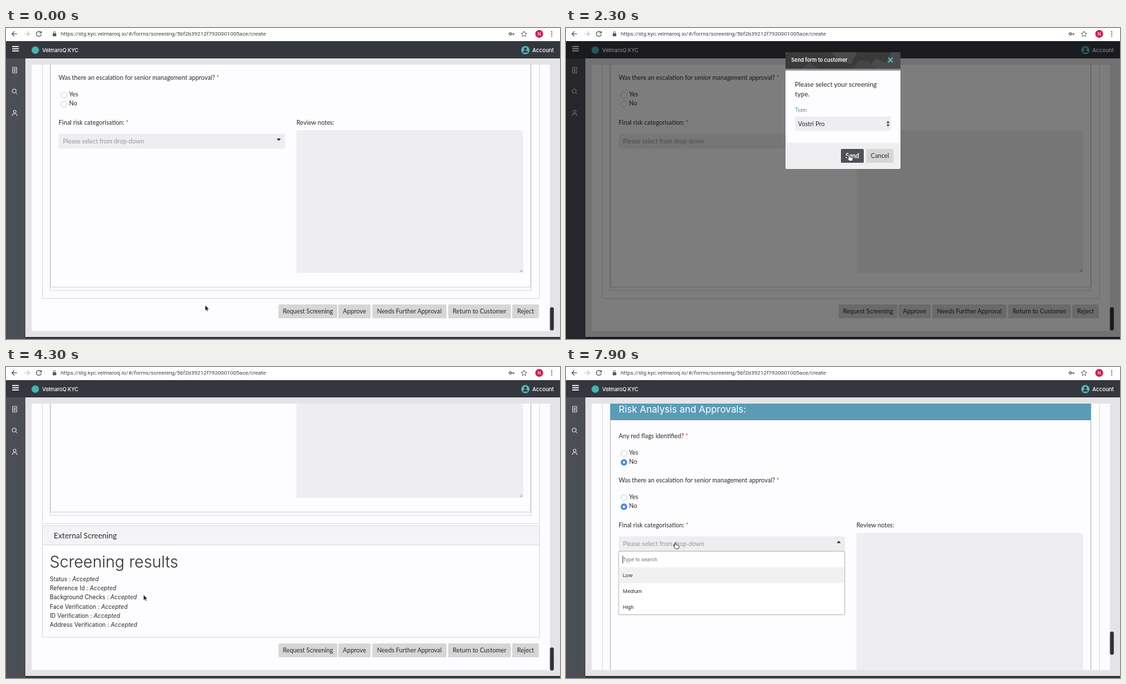
Animation of 800 by 450 pixels, one loop 8 s. Source, as an HTML page:

```html
<!DOCTYPE html>
<html lang="en">
<head>
<meta charset="utf-8">
<title>Screening form</title>
<style>
html, body { margin: 0; width: 100%; height: 100%; overflow: hidden; background: #fff; }
svg { display: block; width: 100vw; height: 100vh; }
text { font: 8.95px Lato, sans-serif; fill: #2b2b2b; white-space: pre; }
.ui { font-family: Inter, sans-serif; }
.menu { font: 7.65px Roboto, sans-serif; }
.mid { text-anchor: middle; }
.hot { fill: #fff; stroke: #fff; stroke-width: .3; }
.line { fill: none; stroke: #dcdcde; }
.icon { fill: none; stroke: #55585c; stroke-width: 1.1; }
.side { fill: none; stroke: #e4e5e7; stroke-width: 1; }
</style>
</head>
<body>
<svg id="stage" viewBox="0 0 800 450"></svg>
<script>
const LOOP = 8000, STEP = 100;

const rect = (x, y, w, h, fill, extra = '') =>
  `<rect x="${x}" y="${y}" width="${w}" height="${h}" fill="${fill}" ${extra}/>`;
const text = (x, y, str, cls = '', style = '') =>
  `<text x="${x}" y="${y}" class="${cls}" style="${style}">${str}</text>`;
const path = (d, cls = '', extra = '') => `<path d="${d}" class="${cls}" ${extra}/>`;
const circle = (x, y, r, fill, extra = '') =>
  `<circle cx="${x}" cy="${y}" r="${r}" fill="${fill}" ${extra}/>`;
const group = (id, body, extra = '') => `<g id="${id}" ${extra}>${body}</g>`;

const label = (x, y, str, required) =>
  text(x, y, str + (required ? '<tspan fill="#d0342c"> *</tspan>' : ''));

const button = (id, x, y, w, str) => group(id,
  rect(x, y, w, 20, '#d6d6d6', 'rx="1.5"') + text(x + w / 2, y + 13.1, str, 'mid'));

const radio = (y, str, id) =>
  circle(83.7, y + 1, 4.3, '#fff', 'stroke="#c4c4c6" stroke-width=".8"') +
  (id ? group(id, circle(83.7, y + 1, 4.6, '#3f8ee0') + circle(83.7, y + 1, 1.7, '#fff')) : '') +
  text(91, y + 3.1, str);

const browserBar = () =>
  rect(0, 0, 800, 19, '#fff') +
  path('M16 8.5H9M12 5L8.5 8.5L12 12', 'icon') +
  path('M26.5 8.5H33.5M30.5 5L34 8.5L30.5 12', 'icon', 'style="stroke:#c6c8ca"') +
  path('M50.3 6.3A3.6 3.6 0 1 0 51 9.2M51.2 4.5V7.2H48.4', 'icon') +
  rect(67.5, 7.6, 5, 4.4, '#55585c', 'rx=".6"') +
  path('M68.6 7.6V6.4a1.4 1.4 0 0 1 2.8 0V7.6', 'icon', 'style="stroke-width:.8"') +
  text(79, 11.3, 'https://stg.kyc.velmaroq.io/#/forms/screening/5bf2b39212f7920001005ace/create',
    '', 'font:7.94px Roboto,sans-serif;fill:#3f4245') +
  circle(728.3, 8.5, 1.7, 'none', 'stroke="#55585c" stroke-width="1.2"') +
  path('M730 8.5H734M732.8 8.5V10.4', 'icon') +
  path('M748 4.6l1.2 2.7 2.9.3-2.2 1.9.7 2.8-2.6-1.5-2.6 1.5.7-2.8-2.2-1.9 2.9-.3z', 'icon', 'style="stroke-width:.8"') +
  circle(770, 8.5, 5.7, '#cf2057') +
  text(770, 10.9, 'N', 'mid', 'font:6.5px Roboto,sans-serif;fill:#fff') +
  [5.4, 8.5, 11.6].map(y => circle(788, y, .9, '#55585c')).join('');

const appFrame = () =>
  rect(0, 19, 800, 431, '#34373e') +
  rect(0, 44, 28, 406, '#4b4e55') +
  rect(28, 44, 772, 403, '#e4e3e6') +
  rect(37, 53, 748.5, 385.5, '#fdfcfe') +
  path('M9 26.8H18.5M9 30H18.5M9 33.2H18.5', 'side', 'style="stroke:#fff;stroke-width:1.6"') +
  path('M9.5 57H15.5V65H9.5ZM11 59.3H14M11 61H14M11 62.7H14', 'side', 'style="stroke-width:.9"') +
  circle(11.8, 91.2, 2.9, 'none', 'stroke="#e4e5e7"') + path('M14 93.4L16.3 95.7', 'side') +
  circle(12.5, 121, 2, 'none', 'stroke="#e4e5e7"') +
  path('M8.8 127.2a3.7 3.4 0 0 1 7.4 0', 'side') +
  circle(42.3, 32, 5.4, '#45b3b0') +
  text(52.3, 34.8, 'VelmaroQ KYC', 'ui', 'font-size:7.6px;font-weight:500;letter-spacing:-.1px;fill:#fff') +
  circle(750, 32, 6, '#58b9bb') + circle(750, 30.2, 2, '#34373e') +
  path('M746.4 35.6a3.6 3.2 0 0 1 7.2 0z', '', 'fill="#34373e"') +
  text(760, 34.8, 'Account', 'ui', 'font-size:7.8px;font-weight:500;fill:#fff');

const form = () =>
  path('M52.5 -200V391.5H770.5V-200', 'line') +
  path('M63.5 -200V379.8H758.5V-200', 'line') +
  path('M64.5 -200V375H757.5V-200', 'line', 'style="stroke:#d2d2d5"') +
  rect(64, -51, 694, 36, '#5a9cb6') +
  text(76, -25.6, 'Risk Analysis and Approvals:', 'ui', 'font-size:13.6px;fill:#fff') +
  label(76, 11.2, 'Any red flags identified?', true) +
  radio(32, 'Yes') + radio(45, 'No', 'flagNo') +
  label(76, 75.4, 'Was there an escalation for senior management approval?', true) +
  radio(96, 'Yes') + radio(109.2, 'No', 'escalNo') +
  label(76, 139.8, 'Final risk categorisation:', true) +
  rect(76, 153, 327, 21.5, '#eeedef', 'rx="1.5"') +
  text(82.3, 166.6, 'Please select from drop-down', '', 'fill:#97979a') +
  path('', '', 'id="caret" fill="#222"') +
  label(419.5, 139.8, 'Review notes:') +
  rect(419.5, 148, 327, 206.3, '#eeedef', 'rx="1.5"') +
  path('M742 353.2L745.7 349.5M744.2 353.2L745.7 351.7', '', 'stroke="#777" stroke-width=".7"');

const results = () => {
  const rows = ['Status', 'Reference Id', 'Background Checks', 'Face Verification',
    'ID Verification', 'Address Verification'];
  return rect(52.5, 394.5, 718, 161.5, '#fdfcfe', 'stroke="#dcdcde"') +
    rect(52.5, 394.5, 718, 28, '#f4f4f6', 'stroke="#dcdcde"') +
    text(69, 412.8, 'External Screening', '', 'font-size:11.15px') +
    text(63, 455, 'Screening results', 'ui', 'font-size:23px;font-weight:300') +
    rows.map((row, i) => text(63.3, 474.6 + i * 13.36,
      `${row} : <tspan font-style="italic">Accepted</tspan>`, 'ui', 'font-size:8.45px')).join('');
};

const actions = () =>
  rect(391.8, 398.4, 88.4, 23.2, '#a9adb1', 'id="glow" rx="3"') +
  button('request', 393.5, 400, 85, 'Request Screening') +
  button('approve', 480, 400, 46.5, 'Approve') +
  button('further', 529, 400, 107, 'Needs Further Approval') +
  button('back', 638.5, 400, 90.5, 'Return to Customer') +
  button('reject', 731, 400, 38.5, 'Reject');

const dropdown = () =>
  rect(76, 174.5, 326.6, 92, '#fff', 'stroke="#b3b3b6" stroke-width=".9" rx="1"') +
  rect(76.5, 197.8, 325.6, 23, '#f0f1f2') +
  rect(81.6, 181, .8, 11, '#222') +
  text(82, 189, 'Type to search', 'menu', 'fill:#75757a') +
  ['Low', 'Medium', 'High'].map((s, i) => text(82, 212.2 + i * 22.8, s, 'menu')).join('');

const modal = () =>
  rect(0, 19, 800, 431, '#000', 'opacity=".5"') +
  rect(317, 35, 166, 169, '#fdfcfe', 'rx="3"') +
  path('M317 59V38a3 3 0 0 1 3-3H480a3 3 0 0 1 3 3V59z', '', 'fill="#3a3a3b"') +
  path('M382 35L396 48L412 52L420 35ZM436 59L447 44L462 50L470 35H479L483 41V59Z', '', 'fill="#4a4a4b"') +
  path('M414 59L424 46L438 49L446 59ZM340 59L352 50L366 59Z', '', 'fill="#454546"') +
  rect(317, 59, 166, 2.6, '#8d8d8f') +
  text(325.3, 49, 'Send form to customer', 'ui', 'font-size:7.35px;font-weight:600;fill:#fff') +
  path('M465.4 43L471.8 49.6M471.8 43L465.4 49.6', '', 'stroke="#5cc0c4" stroke-width="1.7"') +
  text(330.6, 85.2, 'Please select your screening', '', 'font-size:9.65px') +
  text(330.6, 98.6, 'type.', '', 'font-size:9.65px') +
  text(330.8, 120.8, 'Type:', '', 'font-size:7.5px;fill:#4c8ca3') +
  rect(331, 128, 138.5, 21, '#eeedef', 'rx="1.5"') +
  text(335, 141.6, 'Vostri Pro') +
  path('M462.8 137.5L465 134.3L467.2 137.5ZM462.8 139.5L465 142.7L467.2 139.5Z', '', 'fill="#333"') +
  path('M317 166H483V201a3 3 0 0 1-3 3H320a3 3 0 0 1-3-3z', '', 'fill="#efeff1"') +
  button('send', 397, 175, 33, 'Send') +
  button('cancel', 433.5, 175, 39.5, 'Cancel');

const pointer = () =>
  path('M0 0V8.2L1.9 6.5L3.2 9.3L4.6 8.7L3.3 6H5.9Z', '', 'id="arrow" fill="#111" stroke="#fff" stroke-width=".6"') +
  path('M.2 .7Q1.1-.3 2 .7V3.2Q3.2 2.7 3.8 3.5Q5 3.1 5.4 4Q6.6 3.9 6.7 5V6.9L5.9 9H1.6L-.9 5.9Q-1-.1 .2 5.3Z',
    '', 'id="hand" fill="#fff" stroke="#222" stroke-width=".8"');

document.getElementById('stage').innerHTML =
  '<clipPath id="clip"><rect x="37" y="53" width="748.5" height="385.5"/></clipPath>' +
  appFrame() +
  `<g clip-path="url(#clip)">${group('page',
    form() + group('panel', results()) + group('actions', actions()) + group('dropdown', dropdown()))}</g>` +
  rect(785.5, 404, 5.6, 33.5, '#323338', 'id="thumb" rx="2.6"') +
  group('modal', modal()) + browserBar() + group('pointer', pointer());

const $ = id => document.getElementById(id);
const show = (id, on) => { $(id).style.display = on ? '' : 'none'; };
const move = (id, x, y) => $(id).setAttribute('transform', `translate(${x} ${y})`);
const smooth = p => p * p * (3 - 2 * p);

// Eased value of [time, ...values] keys at time t.
function track(keys, t) {
  const i = keys.findIndex(k => k[0] > t);
  if (i < 0) return keys[keys.length - 1].slice(1);
  if (i === 0) return keys[0].slice(1);
  const a = keys[i - 1], b = keys[i];
  const p = smooth((t - a[0]) / (b[0] - a[0]));
  return a.slice(1).map((v, j) => v + (b[j + 1] - v) * p);
}

const POINTER = [
  [0, 287.5, 401], [900, 426, 407], [1400, 426, 407], [2300, 407.5, 183.5],
  [3300, 407.5, 183], [4200, 198.5, 316], [4300, 198.5, 329.5], [5100, 173, 367],
  [5800, 173, 367], [6300, 224, 59.5], [6400, 88, 139.5], [6600, 88, 139.5],
  [6800, 87, 184], [7000, 86, 200], [7300, 86, 200], [7800, 156.5, 254]
];
const SCROLL = [[2900, 0], [3200, -165], [5400, -165], [5800, 92]];
const MODAL = [[1100, 0], [1300, 1], [2400, 1], [2600, 0]];

function heat(id, on) {
  const [box, str] = $(id).children;
  box.setAttribute('fill', on ? '#4e5257' : '#d6d6d6');
  str.setAttribute('class', on ? 'mid hot' : 'mid');
}

function draw(t) {
  const [x, y] = track(POINTER, t), [dy] = track(SCROLL, t), [fade] = track(MODAL, t);
  const panel = t >= 2700, open = t >= 7900;
  const hand = (t >= 800 && t < 1600) || (t >= 2200 && t < 2600) || t >= 7700;

  move('pointer', x, y);
  show('arrow', !hand);
  show('hand', hand);

  move('page', 0, dy);
  move('actions', 0, panel ? 165 : 0);
  show('panel', panel);
  $('thumb').setAttribute('y', panel ? 391 - dy * .089 : 404);

  heat('request', t >= 800 && t < 1200);
  show('glow', t >= 1000 && t < 1200);
  heat('send', t >= 2200);
  show('modal', fade > 0);
  $('modal').style.opacity = fade;

  show('flagNo', t >= 6600);
  show('escalNo', t >= 7200);
  show('dropdown', open);
  $('caret').setAttribute('d', open ? 'M391 162.8H396.8L393.9 159.6Z' : 'M391 160H396.8L393.9 163.2Z');
}

const start = performance.now();
function tick() {
  const t = (performance.now() - start) % LOOP;
  draw(Math.floor(t / STEP) * STEP);
  requestAnimationFrame(tick);
}
tick();
</script>
</body>
</html>
```
